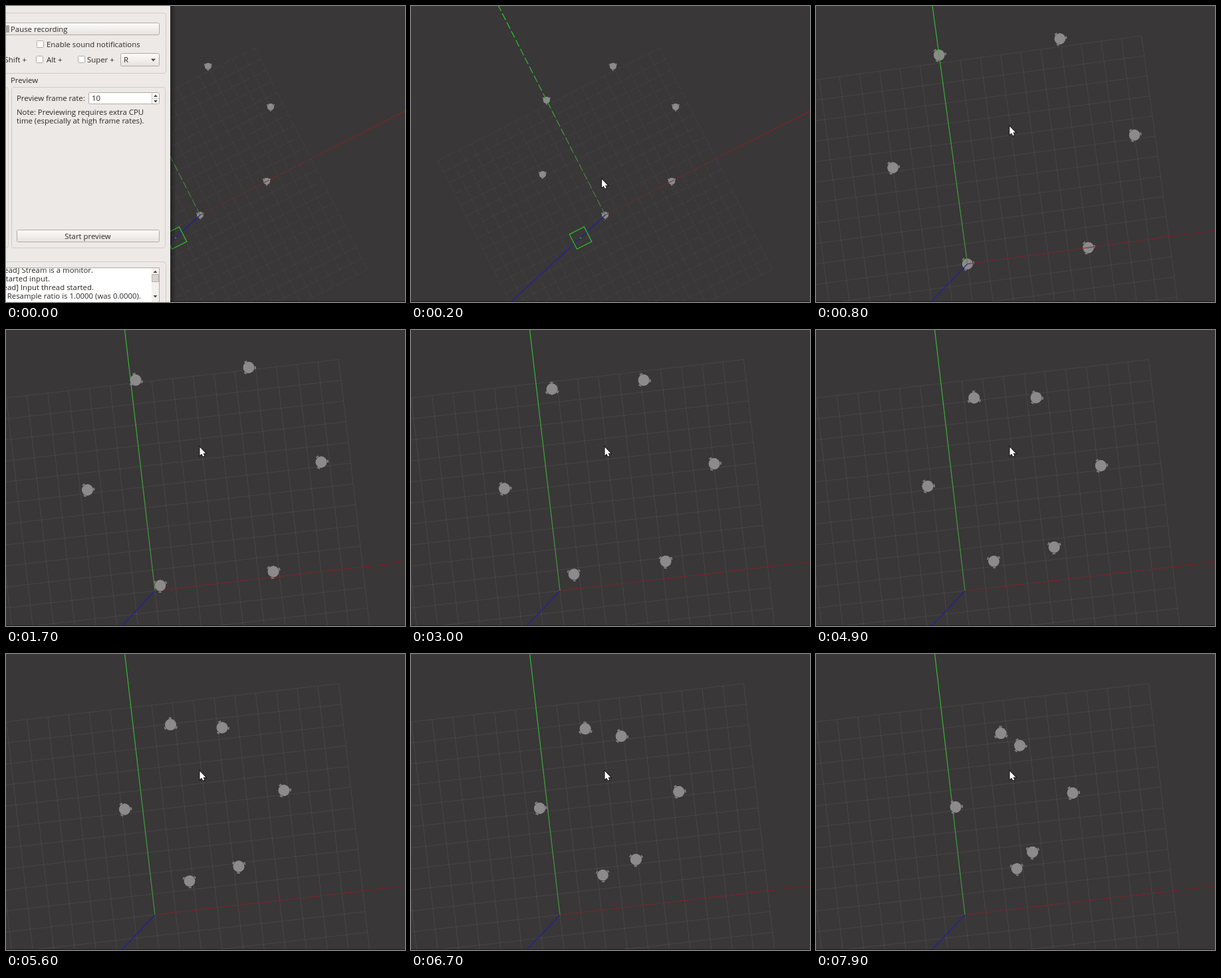
These frames come from a looping animation (600 px wide and 446 px high, 8000 ms). An HTML page with a canvas:

```html
<!DOCTYPE html>
<html lang="en">
<head>
<meta charset="utf-8">
<title>Robots crossing a grid</title>
<style>
  html, body { margin: 0; width: 100%; height: 100%; overflow: hidden; background: #393738; }
  canvas, svg { position: absolute; left: 0; top: 0; width: 600px; height: 446px; }
  text { font: 11.4px "Open Sans", "Noto Sans", sans-serif; fill: #2b2724; }
  .end { text-anchor: end; }
  .mid { text-anchor: middle; }
  .frame { fill: none; stroke: #d2ccc7; }
  .button { fill: url(#face); stroke: #b3aca6; }
  .field { fill: #fff; stroke: #b3aca6; }
  .arrow { fill: #4c4743; }
</style>
</head>
<body>
<canvas id="stage" width="600" height="446"></canvas>
<svg id="panel" viewBox="0 0 600 446">
  <defs>
    <linearGradient id="face" x2="0" y2="1">
      <stop stop-color="#fcfbfa"/><stop offset="1" stop-color="#e7e2de"/>
    </linearGradient>
    <linearGradient id="shade">
      <stop stop-color="#000" stop-opacity=".35"/><stop offset="1" stop-color="#000" stop-opacity="0"/>
    </linearGradient>
  </defs>
  <rect x="247" width="9" height="446" fill="url(#shade)"/>
  <rect width="247" height="446" fill="#ede9e6"/>

  <path class="frame" d="M0 10.5H237Q240.5 10.5 240.5 14V98Q240.5 101.5 237 101.5H0"/>
  <rect class="button" x="-9.5" y="25.5" width="240" height="18" rx="2"/>
  <rect x="0" y="29" width="5" height="11" rx="1" fill="#a9a5a2"/>
  <text x="7" y="38.5">Pause recording</text>
  <rect class="field" x="46.5" y="52.5" width="10" height="10" rx="1"/>
  <text x="61" y="62">Enable sound notifications</text>
  <text class="end" x="31" y="85">Shift +</text>
  <rect class="field" x="45.5" y="75.5" width="10" height="10" rx="1"/>
  <text x="61" y="85">Alt +</text>
  <rect class="field" x="108.5" y="75.5" width="10" height="10" rx="1"/>
  <text x="122" y="85">Super +</text>
  <rect class="button" x="172.5" y="71.5" width="58" height="19" rx="2"/>
  <text x="177" y="85">R</text>
  <path class="arrow" d="M218 79.500h7l-3.500 4z"/>

  <text x="7" y="116">Preview</text>
  <path class="frame" d="M0 122.500Q3.500 122.500 3.500 126V361Q3.500 364.500 0 364.500"/>
  <rect class="frame" x="8.500" y="122.500" width="231" height="242" rx="3"/>
  <text x="16" y="143">Preview frame rate:</text>
  <rect class="field" x="124.500" y="130.500" width="106" height="17" rx="2"/>
  <text x="129" y="143">10</text>
  <path d="M219.500 131V147M220 139.500H230" stroke="#c9c3be"/>
  <path class="arrow" d="M222 137h6l-3-3.500zM222 142h6l-3 3.500z"/>
  <text x="16" y="164">Note: Previewing requires extra CPU</text>
  <text x="16" y="177">time (especially at high frame rates).</text>
  <rect class="button" x="16.500" y="337.500" width="214" height="18" rx="2"/>
  <text class="mid" x="123" y="351">Start preview</text>

  <path class="frame" d="M0 385.500H237Q240.500 385.500 240.500 389V446"/>
  <path class="field" d="M-1 394.500H230.500V447H-1z"/>
  <svg x="0" y="395" width="219" height="51" viewBox="0 395 219 51" style="left:auto">
    <text class="end" x="131" y="402">[thread] Stream is a monitor.</text>
    <text class="end" x="66" y="415">Started input.</text>
    <text class="end" x="132" y="428">[thread] Input thread started.</text>
    <text class="end" x="203" y="441">[thread] Resample ratio is 1.0000 (was 0.0000).</text>
  </svg>
  <rect x="219" y="395" width="11" height="51" fill="#f3f0ee"/>
  <rect x="219.500" y="404.500" width="10" height="11" fill="#d8d3cf" stroke="#b9b2ac"/>
  <path class="arrow" d="M221.500 402h6l-3-3.500zM221.500 436h6l-3 3.500z"/>
</svg>
<script>
const LOOP = 8000, STEP = 100, MOVE_FROM = 200, MOVE_TO = 900;
const ctx = document.getElementById('stage').getContext('2d');
const panel = document.getElementById('panel');

// The floor seen before and after the view is turned and zoomed
const before = { x: 292, y: 315, size: 18.71, turn: -0.471, sky: [-142, 131], box: [255, 349.5], mouse: [287, 261] };
const after = { x: 224, y: 393, size: 31.45, turn: -0.115, sky: [-50, 53], box: [140, 490], mouse: [291.5, 176.5] };

// home: place on the floor; path: screen places at the given times; turn: wheel angle once under way
const TIMES = [1000, 1700, 3000, 4100, 5600, 7900];
const H = 6 * Math.sqrt(3);
const robots = [
  { home: [0, 0], path: [[232, 385], [245, 368], [257.500, 355.500], [276, 342], [302, 323.500]], turn: 85 },
  { home: [6, 0], path: [[402, 364], [383, 348.500], [367.500, 335.500], [350, 320], [325.500, 298.500]], turn: 93 },
  { home: [9, H / 2], path: [[474, 199], [456, 201.500], [440, 203], [418, 205.500], [386, 209.500]], turn: 115 },
  { home: [6, H], path: [[365, 56.500], [350, 75.500], [338, 91.500], [325, 111], [306.500, 138]], turn: 126 },
  { home: [0, H], path: [[195, 75.500], [212, 89], [226.500, 97.500], [247.500, 106.500], [278, 119.500]], turn: 146 },
  { home: [-3, H / 2], path: [[122.500, 241], [140.500, 239], [156, 237], [178.500, 234], [210, 230.500]], turn: 115 }
];

const mix = (a, b, p) => a + (b - a) * p;
const mixPair = (a, b, p) => [mix(a[0], b[0], p), mix(a[1], b[1], p)];
const clamp = v => Math.min(1, Math.max(0, v));
const ease = v => v * v * (3 - 2 * v);

function viewAt(p) {
  const size = before.size * (after.size / before.size) ** p;
  const turn = mix(before.turn, after.turn, p);
  const c = Math.cos(turn) * size, s = Math.sin(turn) * size;
  const x = mix(before.x, after.x, p), y = mix(before.y, after.y, p);
  return { p, size, turn, at: (u, v) => [x + u * c + v * s, y + u * s - v * c] };
}

function line(a, b, color, width = 1, dash = []) {
  ctx.strokeStyle = color;
  ctx.lineWidth = width;
  ctx.setLineDash(dash);
  ctx.beginPath();
  ctx.moveTo(...a);
  ctx.lineTo(...b);
  ctx.stroke();
  ctx.setLineDash([]);
}

function fade(a, b, from, to) {
  const g = ctx.createLinearGradient(...a, ...b);
  g.addColorStop(0, from);
  g.addColorStop(1, to);
  return g;
}

function drawGrid({ at, p }) {
  const color = `rgba(255,255,255,${mix(0.042, 0.07, p)})`;
  const dash = p < 0.5 ? [13, 3] : [];
  for (let i = -10; i <= 10; i++) {
    line(at(i, -10), at(i, 10), color, 1, dash);
    line(at(-10, i), at(10, i), color, 1, dash);
  }
}

function drawAxes({ at, p }) {
  const o = at(0, 0), far = at(20, 0), up = at(0, 20), near = at(10.500, 0);
  const sky = mixPair(before.sky, after.sky, p);
  const gap = 4 * (1 - p);
  const red = fade(o, far, p < 0.5 ? '#5c2c30' : '#70222a', p < 0.5 ? '#ae141c' : '#8c161e');
  line(o, near, red, 1, gap ? [11, gap] : []);
  line(near, far, red);
  const green = fade(o, up, p < 0.5 ? '#4a7448' : '#44903e', '#28d828');
  line(o, up, green, 1.200, gap ? [11, gap] : []);
  line(o, [o[0] + sky[0] * 1.500, o[1] + sky[1] * 1.500], '#22209c', 1.200);
}

function drawBox({ p, size, turn }) {
  const [x, y] = mixPair(before.box, after.box, p);
  const side = 25 * size / before.size;
  ctx.save();
  ctx.translate(x, y);
  ctx.rotate(turn);
  ctx.strokeStyle = '#2fc52b';
  ctx.lineWidth = 1.200;
  ctx.strokeRect(-side / 2, -side / 2, side, side);
  ctx.fillStyle = '#3f9a3c';
  ctx.fillRect(-1, -1, 2, 2);
  ctx.restore();
}

function robotPlace(robot, t, view) {
  const home = view.at(...robot.home);
  if (t <= TIMES[0]) return home;
  const i = TIMES.findIndex(end => t <= end);
  const stops = [home, ...robot.path];
  return mixPair(stops[i - 1], stops[i], (t - TIMES[i - 1]) / (TIMES[i] - TIMES[i - 1]));
}

function drawRobot(robot, t, view) {
  const [x, y] = robotPlace(robot, t, view);
  const k = view.size / after.size;
  const rest = 110 + (view.turn - after.turn) * 180 / Math.PI;
  const angle = mix(rest, robot.turn, clamp((t - 1000) / 1000));
  ctx.save();
  ctx.translate(x, y);
  ctx.rotate(angle * Math.PI / 180);
  ctx.scale(k, k);
  ctx.fillStyle = '#7d7b7c';
  for (let i = 0; i < 3; i++) {
    ctx.fillRect(8.800, -2, 2, 4);
    ctx.rotate(Math.PI * 2 / 3);
  }
  ctx.fillStyle = '#8c8a8b';
  ctx.beginPath();
  ctx.arc(0, 0, 8.400, 0, Math.PI * 2);
  ctx.fill();
  ctx.restore();
}

const arrow = new Path2D('M0 0V12.500L2.800 10L4.600 14L6.800 13L5 9.200H8.800Z');
function drawMouse(p) {
  ctx.save();
  ctx.translate(...mixPair(before.mouse, after.mouse, p));
  ctx.strokeStyle = '#111';
  ctx.lineWidth = 1.800;
  ctx.stroke(arrow);
  ctx.fillStyle = '#fff';
  ctx.fill(arrow);
  ctx.restore();
}

function draw(now) {
  const t = Math.floor(now % LOOP / STEP) * STEP;
  const view = viewAt(ease(clamp((t - MOVE_FROM) / (MOVE_TO - MOVE_FROM))));
  ctx.fillStyle = '#393738';
  ctx.fillRect(0, 0, 600, 446);
  drawGrid(view);
  for (const robot of robots.slice(1)) drawRobot(robot, t, view);
  if (t > 1000) drawAxes(view);
  for (const robot of robots) drawRobot(robot, t, view);
  if (t <= 1000) drawAxes(view);
  if (t < MOVE_TO) drawBox(view);
  ctx.fillStyle = '#1c1b1b';
  ctx.fillRect(0, 445, 600, 1);
  const covered = t < STEP;
  if (!covered) drawMouse(view.p);
  panel.style.visibility = covered ? 'visible' : 'hidden';
}

const start = performance.now();
function tick() {
  draw(performance.now() - start);
  requestAnimationFrame(tick);
}
tick();
</script>
</body>
</html>
```
